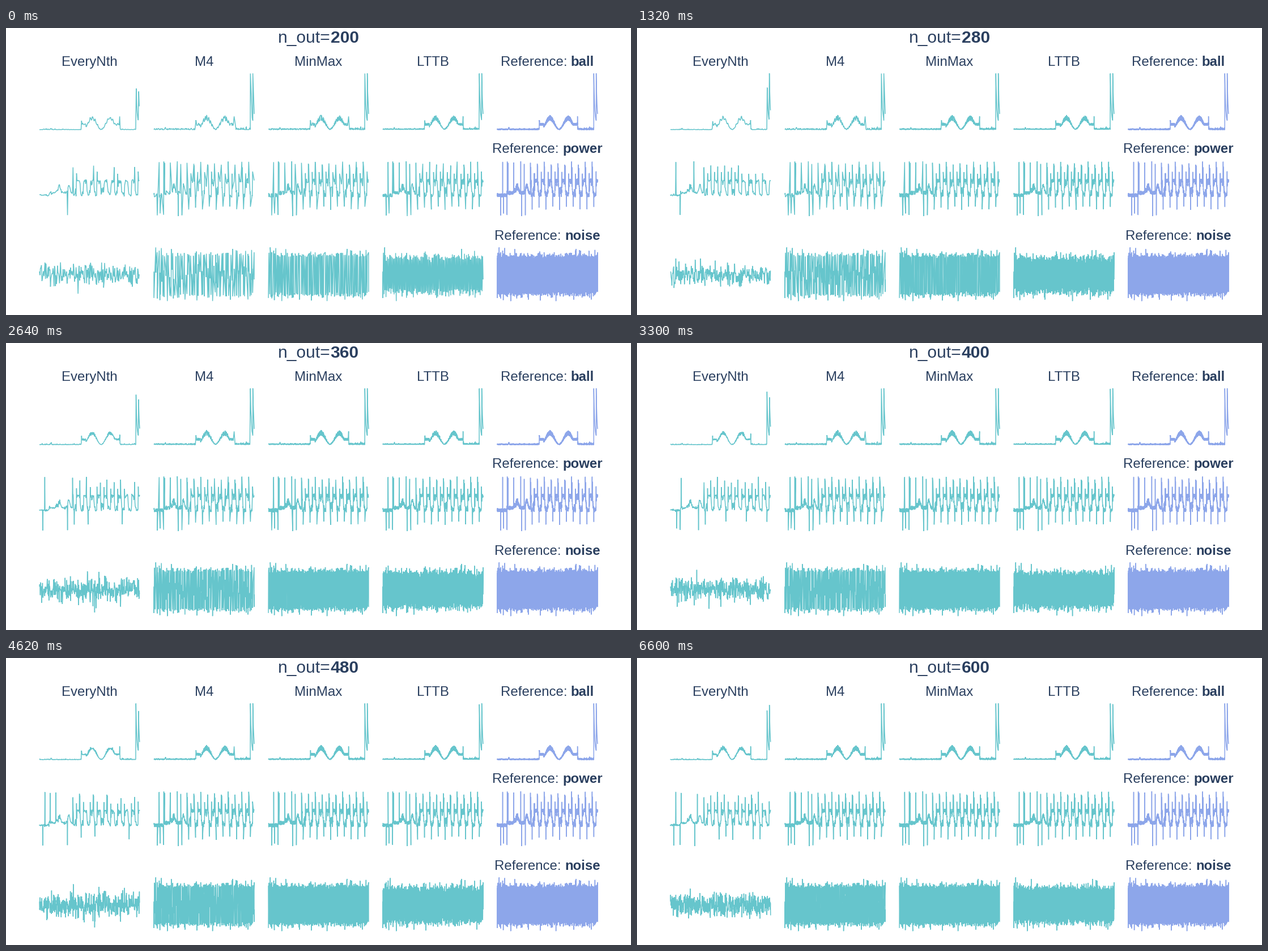
Animation of 1103 by 508 pixels, one loop 7260 ms. Source, as a matplotlib script:

```python
import math

import matplotlib.pyplot as plt
import numpy as np
from matplotlib.animation import FuncAnimation
from matplotlib.textpath import TextPath

W, H, DPI = 1103, 508, 100
PX = 72 / DPI
FONT = "Liberation Sans"
TEAL, BLUE, INK = "#66C5CC", "#8DA6EA", "#2A3F5F"
LEFT, PITCH_X, PITCH_Y, SPAN = 59, 202, 154, 177
SIZES = range(200, 601, 40)
STEP_MS = 660


# ---------- signals, in pixels above their zero row ----------

def bump(u, at, width):
    return np.exp(-((u - at) / width) ** 2)


def ball_signal(size=15000):
    rng = np.random.default_rng(4)
    u = np.linspace(0, SPAN, size)
    v = np.zeros(size)

    bounce = (u > 74) & (u < 142)
    arcs = 20 * np.sin(math.pi * (u - 77) / 32) ** 2
    shelf = np.where((u < 82) | (u > 132), 9, 0)
    v[bounce] = np.maximum(arcs, shelf)[bounce]
    ripple = 2.8 * np.sin(2 * math.pi * 240 * u / SPAN) + rng.normal(0, .8, size)
    v += ripple * v / 20 + rng.exponential(.38, size) * np.where(u > 142, 1.5, 1)
    v += 2.5 * bump(u, 20.5, .8) + 8 * bump(u, 74.3, .4) + 13 * bump(u, 141.6, .2)

    for start in (170.3, 174.6):
        tail = u >= start
        v[tail] = 12 + 88 * np.exp((start - u[tail]) / 1.4)
    return v


def power_signal(size=20000):
    rng = np.random.default_rng(11)
    u = np.linspace(0, SPAN, size)
    period, first = 12.1, 58.5

    # held random levels give the stepped look
    steps = np.repeat(rng.normal(0, 1, size // 80), 80)
    early = 4 * (u > 17) + 11 * bump(u, 34, 4) * (1 + .4 * steps) + 14 * bump(u, 52, 2.5)
    turn = 2 * math.pi * (u - first) / period
    daily = 15 + 14 * np.tanh(2.5 * np.cos(turn + .9)) + 5 * steps
    v = np.where(u < first, early, np.clip(daily, 0, 26)) + rng.normal(0, 1.1, size)

    def spike(at, level, width=.15):
        v[np.abs(u - at) < width / 2] = level + rng.uniform(-3, 3)

    spike(9.5, 60, .4)
    for at in (17.6, 19, 29, 41.4, 47.5):
        spike(at, 58)
    for at in (6, 11, 17.2, 43, 49.5):
        spike(at, -35)
    for at in np.arange(first, SPAN, period):
        spike(at, 57)
        spike(at + .7, 50, .2)
        spike(at + 3, -23)
        spike(at + 7, 40, .4)
    return v


def noise_signal(size=200000):
    return np.random.default_rng(23).normal(0, 10.6, size)


# ---------- downsamplers, each returns the kept indices ----------

def every_nth(v, n):
    return np.arange(0, len(v), math.ceil(len(v) / n))


def extremes(v, bins, ends=False):
    edges = np.linspace(0, len(v), bins + 1).astype(int)
    keep = []
    for lo, hi in zip(edges[:-1], edges[1:]):
        part = v[lo:hi]
        keep += [lo + part.argmin(), lo + part.argmax()]
        if ends:
            keep += [lo, hi - 1]
    return np.sort(keep)


def m4(v, n):
    return extremes(v, n // 4, ends=True)


def min_max(v, n):
    return extremes(v, n // 2)


def lttb(v, n):
    last = len(v) - 1
    edges = np.append(np.linspace(1, last, n - 1).astype(int), last + 1)
    keep = [0]
    for lo, mid, hi in zip(edges[:-2], edges[1:-1], edges[2:]):
        a = keep[-1]
        cx, cy = (mid + hi - 1) / 2, v[mid:hi].mean()
        x = np.arange(lo, mid)
        area = np.abs((a - cx) * (v[lo:mid] - v[a]) - (a - x) * (cy - v[a]))
        keep.append(lo + area.argmax())
    return np.array(keep + [last])


METHODS = [("EveryNth", every_nth), ("M4", m4), ("MinMax", min_max), ("LTTB", lttb)]
# name, samples, pixel row of zero
SIGNALS = [("ball", ball_signal(), 180), ("power", power_signal(), 296),
           ("noise", noise_signal(), 437)]


# ---------- stage ----------

fig = plt.figure(figsize=(W / DPI, H / DPI), dpi=DPI, facecolor="white")
ax = fig.add_axes([0, 0, 1, 1])
ax.set_xlim(0, W)
ax.set_ylim(H, 0)
ax.axis("off")


def advance(text, size, weight):
    """Pen advance of a text, including its outer spaces."""
    def ink(s):
        path = TextPath((0, 0), s, size=size, prop={"family": FONT, "weight": weight})
        return path.get_extents().width
    return ink(text + text) - ink(text)


def label(center, y, size, plain, strong=""):
    """Centre a line made of a regular and an optional bold part."""
    parts = [(s, w) for s, w in ((plain, "normal"), (strong, "bold")) if s]
    widths = [advance(s, size, w) for s, w in parts]
    x = center - sum(widths) / 2
    made = []
    for (s, w), width in zip(parts, widths):
        made.append(ax.text(x, y, s, family=FONT, weight=w, fontsize=size * PX,
                            color=INK, ha="left", va="baseline"))
        x += width
    return made


def trace(color):
    return ax.plot([], [], color=color, lw=1.5 * PX, solid_joinstyle="bevel",
                   solid_capstyle="butt")[0]


def place(line, col, v, zero, keep):
    line.set_data(LEFT + PITCH_X * col + SPAN * keep / (len(v) - 1), zero - v[keep])


def middle(col):
    return LEFT + PITCH_X * col + SPAN / 2


count = label(W / 2, 26.5, 30, "n_out=", str(SIZES[0]))[1]
for col, (name, _) in enumerate(METHODS):
    label(middle(col), 67, 24, name)
for row, (name, v, zero) in enumerate(SIGNALS):
    label(middle(4), 67 + PITCH_Y * row, 24, "Reference: ", name)
    place(trace(BLUE), 4, v, zero, min_max(v, 4000))

lines = [[trace(TEAL) for _ in METHODS] for _ in SIGNALS]


def draw(i):
    n = SIZES[i]
    count.set_text(str(n))
    for row, (_, v, zero) in enumerate(SIGNALS):
        for col, (_, method) in enumerate(METHODS):
            place(lines[row][col], col, v, zero, method(v, n))
    return []


anim = FuncAnimation(fig, draw, frames=len(SIZES), interval=STEP_MS,
                     repeat=True, repeat_delay=0)
plt.show()
```
